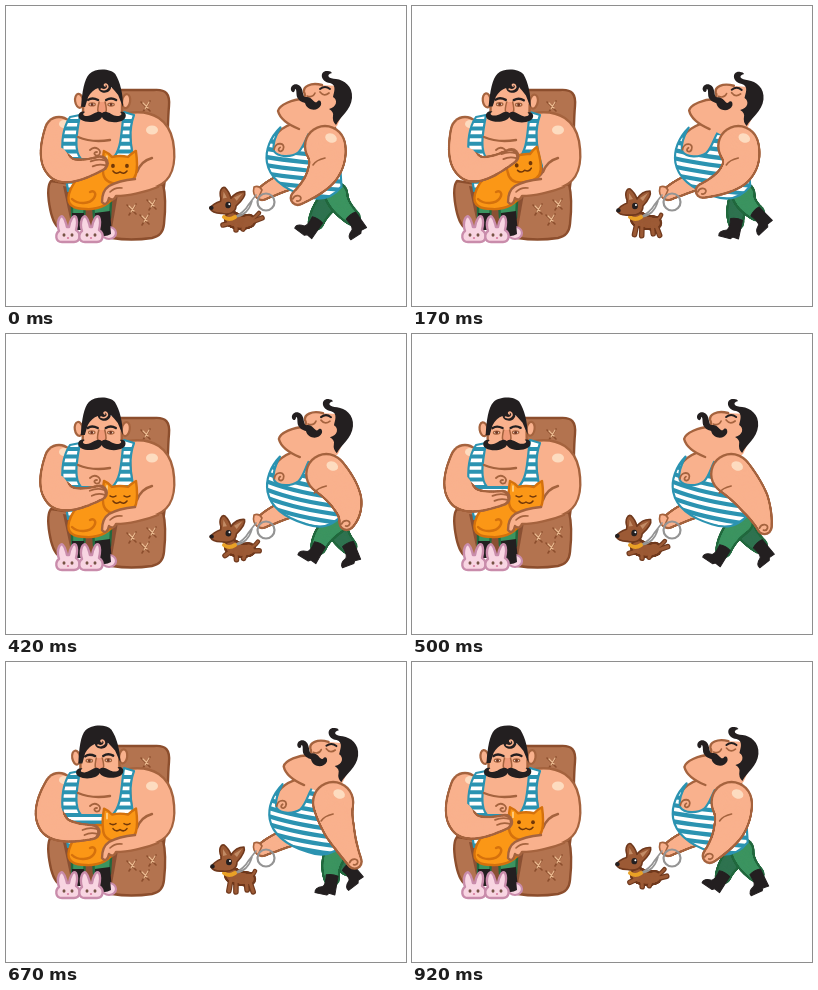
Recreate the animation shown at these times as an HTML page with a canvas. Size 400 px wide and 300 px high, loop 0.96 s.

```html
<!DOCTYPE html>
<html lang="en">
<head>
<meta charset="utf-8">
<title>Strongman and his pets</title>
<style>
html, body { margin: 0; width: 100%; height: 100%; overflow: hidden; background: #fff; }
canvas { display: block; width: 400px; height: 300px; }
</style>
</head>
<body>
<canvas id="stage" width="400" height="300"></canvas>
<script>
const ctx = document.getElementById('stage').getContext('2d');
const LOOP = 960, STANCE = 560;
const SKIN = '#f9b18d', SKIN_LINE = '#a5633e', GLOW = '#fddcc0', BLACK = '#231f20';
const BLUE = '#2b93b1', SOFA = '#b3734f', SOFA_LINE = '#8c4e2d', DARK = '#8a5033';
const GREEN = '#3c9460', GREEN_LINE = '#23693f', PANTS_DARK = '#2f7350';
const CAT = '#fb9716', CAT_LINE = '#d5710c', PINK = '#f8d5e2', PINK_LINE = '#c98cab';
const DOG = '#9c5a35', DOG_LINE = '#70391d', GREY = '#949494';

// Cosine that peaks at the given moment, once or more per loop.
const wave = (t, peak = 0, cycles = 1) => Math.cos((t - peak) / LOOP * cycles * 2 * Math.PI);
const lerp = (a, b, u) => a + (b - a) * u;
const between = (p, q, u) => p.map((v, k) => lerp(v, q[k], u));
const smooth = u => u * u * (3 - 2 * u);

function draw(d, fill, stroke, width = 2.4) {
  const path = new Path2D(d);
  if (fill) { ctx.fillStyle = fill; ctx.fill(path); }
  if (stroke) { ctx.strokeStyle = stroke; ctx.lineWidth = width; ctx.stroke(path); }
}

const line = (d, color, width) => draw(d, null, color, width);

function oval(x, y, rx, ry, fill, stroke, width = 2.2, angle = 0) {
  ctx.beginPath();
  ctx.ellipse(x, y, rx, ry, angle, 0, 7);
  if (fill) { ctx.fillStyle = fill; ctx.fill(); }
  if (stroke) { ctx.strokeStyle = stroke; ctx.lineWidth = width; ctx.stroke(); }
}

function group(dx, dy, degrees, cx, cy, paint) {
  ctx.save();
  ctx.translate(cx + dx, cy + dy);
  ctx.rotate(degrees * Math.PI / 180);
  ctx.translate(-cx, -cy);
  paint();
  ctx.restore();
}

// Tapered limb bent through b; radii belong to a, b and c.
function limb(a, b, c, radii, fill, stroke, from = 0) {
  for (const [grow, color, start] of [[1.2, stroke, from], [-1.2, fill, Math.max(0, from - .15)]]) {
    ctx.fillStyle = color;
    for (let u = start; u <= 1.001; u += .02) {
      const [x, y] = a.map((v, k) =>
        (1 - u) ** 2 * v + 2 * u * (1 - u) * (2 * b[k] - (v + c[k]) / 2) + u * u * c[k]);
      const r = u < .5 ? lerp(radii[0], radii[1], u * 2) : lerp(radii[1], radii[2], u * 2 - 1);
      ctx.beginPath();
      ctx.arc(x, y, r + grow, 0, 7);
      ctx.fill();
    }
  }
}

function striped(d, first, last, gap, drop) {
  ctx.save();
  ctx.clip(new Path2D(d));
  draw(d, '#fff');
  for (let y = first; y < last; y += gap)
    line(`M40,${y} H250 Q285,${y + drop * .7} 345,${y + drop}`, BLUE, gap * .52);
  ctx.restore();
  line(d, BLUE, 2.2);
}

function tuft(x, y) {
  group(x, y, 0, 0, 0, () => {
    line('M-5,-4 L4,5 M4,-5 L-3,6', SOFA_LINE, 1.6);
    line('M-3,-3 L2,2 M3,-4 L-1,3', '#eab98f', 1.3);
  });
}

function bunny(x, y) {
  group(x, y, 0, 0, 0, () => {
    draw('M-9,-3 C-12,-12 -8,-20 -5,-17 C-2,-14 -2,-10 -1,-7 H1 C2,-13 5,-20 8,-17 C10,-13 9,-8 8,-4 ' +
         'C14,0 12,8 6,8 H-6 C-13,8 -13,0 -9,-3Z', PINK, PINK_LINE);
    for (const side of [-4, 4]) oval(side, 1, 1.5, 1.8, '#765345');
    oval(0, 4, 1.2, .9, '#d880a0');
  });
}

function chair() {
  draw('M108,84 H148 C160,83 164,88 163,100 C161,120 163,150 157,188 H105Z', SOFA, SOFA_LINE);
  tuft(140, 100);
  draw('M45,175 C39,182 44,216 53,222 H104 L106,232 Q125,235 146,232 Q157,230 158,218 ' +
       'C160,200 160,190 157,178 L120,186Z', SOFA, SOFA_LINE);
  draw('M57,180 L66,222 H106 L112,188Z', DARK);
  tuft(126, 203); tuft(146, 198); tuft(139, 213);
  draw('M66,196 H79 L78,214 H66Z M87,196 H105 L104,212 H88Z', GREEN, GREEN_LINE);
  draw('M66,207 H78 V224 H66Z M89,207 L104,205 L106,228 Q98,233 90,230Z', BLACK);
  oval(103, 227, 7, 6, PINK, PINK_LINE);
  draw('M94,207 L103,206 L105,228 Q98,232 94,228Z', BLACK);
  bunny(62, 228);
  bunny(85, 228);
}

function sitterHead(sway) {
  group(sway * 2.3 - .5, 0, sway * 1.5, 96, 95, () => {
    oval(73, 95, 4, 7, SKIN, SKIN_LINE, 2.2, -.15);
    oval(120, 95, 4, 7, SKIN, SKIN_LINE, 2.2, .15);
    draw('M78,82 L77,104 Q79,116 86,121 H108 Q115,114 116,104 L113,82Z', SKIN);
    line('M77,98 V106 M116,98 V106', SKIN_LINE);
    draw('M75,101 C76,86 78,73 83,68 C89,62 104,62 109,68 C114,76 117,88 117,101 ' +
         'L112,89 Q108,84 105,81 C104,89 93,88 92,82 Q86,84 82,91 L79,101Z', BLACK);
    line('M95,83 C99,85 103,82 101,79 C99,77 97,79 99,80', SKIN, 1.5);
    line('M82,94 Q86,91 92,94 M100,94 Q105,91 110,94', BLACK, 2.4);
    for (const x of [86, 105]) {
      oval(x, 98.5, 3.2, 1.5, '#fff3e8', SKIN_LINE, 1.3);
      oval(x, 98.5, 1.5, 1.5, '#6e3623');
    }
    draw('M93,96 C91,104 91,108 96,109 C101,108 101,104 99,96', '#f09a78', SKIN_LINE, 1.5);
    draw('M96,107 C91,103 87,110 81,110 C77,110 76,108 79,106 C73,104 70,111 75,114 C82,118 94,116 96,111 ' +
         'C98,116 110,118 117,114 C122,111 120,104 114,106 C117,108 115,110 111,110 C106,110 101,103 96,107Z', BLACK);
  });
}

function cat(t, sway) {
  draw('M99,164 C83,159 67,173 63,188 C60,200 69,203 80,203 C95,204 104,197 112,187 L118,174Z', CAT, CAT_LINE);
  line('M66,193 C72,199 84,198 88,192 C91,187 88,184 84,186', CAT_LINE);
  const pressed = Math.max(0, sway) ** 3;
  group(-2 * pressed, 2 * Math.sin(t / LOOP * Math.PI) - 3 * pressed, -10 * pressed, 114, 163, () => {
    draw('M98,145 Q103,147 106,151 Q114,149 122,151 Q126,147 130,145 C131,152 132,160 130,168 ' +
         'C128,176 120,178 114,178 C103,178 97,174 97,165 C96,158 97,151 98,145Z', CAT, CAT_LINE);
    line('M101,150 V155', '#ffd08a', 1.7);
    if (t > 220 && t < 860) {
      line('M104,160 Q107,162 110,160 M118,160 Q121,162 124,160', '#713708', 1.5);
    } else {
      for (const x of [107, 121]) oval(x, 160, 1.9, 2.1, '#713708');
    }
    line('M107,165 Q110,169 114,166 Q118,169 121,165', '#713708', 1.5);
  });
}

function sitter(t) {
  const sway = wave(t, 200);
  const shoulder = [53, 125], elbow = [53 + 6 * sway, 161], hand = [93 + 6.5 * sway, 160 - 10 * sway];
  const arm = from => limb(shoulder, elbow, hand, [14, 14, 7], SKIN, SKIN_LINE, from);

  arm(0);
  oval(58, 118, 5, 4, GLOW);
  draw('M64,111 Q96,100 128,109 L140,150 L112,186 H62Z', SKIN);
  draw('M122,107 C148,103 163,115 167,135 C171,158 166,175 150,181 C135,186 125,187 112,189 L114,176 ' +
       'C124,172 128,172 131,165 L126,150Z', SKIN, SKIN_LINE);
  oval(146, 124, 6, 4.5, GLOW);
  line('M131,166 Q135,155 146,152', SKIN_LINE);
  striped('M64,111 L74,109 C70,130 68,145 75,153 H106 C116,145 115,125 118,106 L128,109 ' +
          'C122,125 125,145 130,160 L115,185 H62 L57,152 C55,135 58,120 64,111Z', 115, 190, 7.6, 0);
  line('M72,131 Q86,137 104,134', SKIN_LINE);
  line('M84,144 C89,139 97,144 93,149 C89,151 86,146 91,146', SKIN_LINE, 1.8);
  sitterHead(sway);
  cat(t, sway);
  draw('M129,173 C118,174 110,176 103,180 C97,184 96,191 96,196 C99,200 102,197 103,192 ' +
       'C106,195 109,193 110,190 C122,190 140,186 152,181', SKIN, SKIN_LINE);
  line('M104,186 Q109,181 116,182', SKIN_LINE, 1.6);
  arm(.48);
  group(...hand, 0, 0, 0, () => line('M-10,-2 Q-3,-5 4,-3 M-8,3 Q-2,0 5,2', SKIN_LINE, 1.8));
}

// The foot rolls back along the ground, then swings forward.
function leg(time, hip, color) {
  const t = time % LOOP;
  const stance = Math.min(1, t / STANCE);
  const swing = Math.max(0, (t - STANCE) / (LOOP - STANCE));
  const x = lerp(lerp(299, 361, stance), 299, smooth(swing));
  const pitch = swing ? lerp(-60, 32, smooth(swing)) : 32 * (1 - stance) ** 3 - 60 * stance ** 3;
  const a = pitch * Math.PI / 180;
  const y = 231 - 9 * Math.abs(Math.sin(a)) - 7 * Math.sin(swing * Math.PI);
  const cuff = [x + 4 * Math.cos(a) + 14 * Math.sin(a), y + 4 * Math.sin(a) - 14 * Math.cos(a)];
  const knee = between(hip, cuff, .5);
  knee[0] -= 3;
  limb(hip, knee, cuff, [11, 9, 7], color, GREEN_LINE);
  group(x, y, pitch, 0, 0, () =>
    draw('M-11,2 Q-12,-3 -4,-5 Q-1,-7 -2,-17 Q4,-19 10,-17 L9,2 L3,1 L1,3Z', BLACK, BLACK, 1));
}

function walkerHead(lift) {
  group(6.5 * lift, .7 * lift, 2 * lift, 310, 100, () => {
    draw('M335,80 L313,79 C304,77 297,81 298,86 Q300,90 297,93 C287,93 273,99 272,105 ' +
         'C274,113 283,119 292,122 L312,132 L331,120 L340,100Z', SKIN);
    line('M316,79 C304,76 297,81 298,86 Q300,90 297,93 C287,93 273,99 272,105 C274,113 283,119 293,123', SKIN_LINE);
    line('M301,90 Q307,92 309,87', SKIN_LINE, 1.6);
    line('M314,86 Q318,91 323,87', SKIN_LINE, 1.7);
    line('M314,83 Q319,79 324,83', BLACK, 2);
    draw('M322,65 C313,64 314,76 324,77 C331,79 328,86 327,91 C332,94 331,101 323,103 Q328,106 327,110 ' +
         'Q326,115 330,119 C334,111 345,104 346,92 C347,80 338,74 330,73 C323,73 319,69 326,67 Q325,65 322,65Z', BLACK);
    draw('M300,91 C296,92 298,84 294,80 C290,76 284,79 285,84 C286,87 289,87 289,83 C291,83 290,87 291,91 ' +
         'C293,95 296,96 299,97 C301,105 312,106 315,99 C316,95 313,93 311,96 C308,98 306,90 300,91Z', BLACK);
  });
}

function walker(t, lift) {
  const sway = 3 * lift, stride = wave(t);
  limb([284 + sway, 174], [268 + sway / 2, 181], [256, 188], [9, 8, 6], SKIN, SKIN_LINE);
  draw('M248,181 Q253,179 256,184 L252,193 Q246,189 248,181Z', SKIN, SKIN_LINE, 1.6);
  const hip = [330 + sway / 2, 188];
  leg(t, hip, PANTS_DARK);
  leg(t + LOOP / 2, hip, GREEN);
  group(sway, 0, stride, 310, 150, () => {
    draw('M286,118 C270,124 264,135 267,148 Q285,160 300,150 L332,145 L328,118Z', SKIN, SKIN_LINE);
    striped('M274,122 C264,132 259,145 261,157 C264,173 277,183 299,190 C313,195 326,193 336,180 ' +
            'L332,130 L306,123 C300,128 299,140 292,147 C285,152 272,152 268,146 C266,140 269,130 274,122Z',
            101, 205, 8.2, 17 - 8 * stride);
    line('M268,144 C269,136 280,137 277,144 C275,148 270,145 274,142', SKIN_LINE, 1.8);
  });
  walkerHead(lift);

  const shoulder = [319 + 9 * lift, 140];
  const elbow = [329 - 12 * stride, 166];
  const hand = [321 - 35 * wave(t, 90), 192 - 8 * wave(t, 240)];
  limb(shoulder, elbow, hand, [20, 15, 7], SKIN, SKIN_LINE);
  group(...shoulder, 0, 0, 0, () => {
    oval(6, -8, 6, 4.5, GLOW, null, 0, .4);
    line('M-12,19 Q-9,14 0,12', SKIN_LINE, 1.6);
  });
  group(...hand, 0, 0, 0, () => line('M-5,1 C-3,-4 4,-3 3,1 Q2,4 -1,3', SKIN_LINE, 1.8));
}

function dog(t, lift) {
  const leap = (1 - lift) ** 2;
  const step = 2 * lift * Math.sin(t / 240 * Math.PI);
  // Forelegs and hind legs: root, standing foot, leaping foot.
  const legs = [
    [[225, 217], [224, 229], [217, 219]], [[240, 217], [240, 228], [237, 223]],
    [[230, 218], [231, 230], [230, 224]], [[243, 217], [246, 230], [256, 212]]
  ].map(([root, stand, jump], i) => {
    const [x, y] = between(stand, jump, leap);
    return `M${root} L${x + (i % 2 ? step : -step)},${y}`;
  }).join(' ');
  const tail = `M243,214 Q247,214 ${between([249, 209], [253, 207], leap)}`;

  line(tail, DOG_LINE, 4.5);
  line(legs, DOG_LINE, 5.6);
  limb([226, 213], [234, 216], [243, 217 - 2 * leap], [7, 6.5, 6], DOG, DOG_LINE);
  line(legs, DOG, 3.2);
  line(tail, DOG, 2.2);
  oval(260, 196, 8.5, 8.5, null, GREY, 2.2);
  line('M227,212 Q238,207 243,198 L250,189 M230,211 Q242,209 246,195', GREY, 1.6);
  line('M218,211 Q223,215 229,211', '#e9a126', 4);
  group(-leap, -leap, 6 * leap, 223, 202, () => {
    draw('M215,194 C212,187 215,182 218,183 Q223,187 225,193 Q230,185 238,185 Q240,190 231,200 ' +
         'C231,207 225,210 217,209 Q208,210 205,205 Q208,200 215,197Z', DOG, DOG_LINE, 1.6);
    draw('M217,187 L221,193 L217,194Z M236,187 L231,195 L228,192Z', '#c28b65');
    oval(223, 200, 2.9, 3.2, BLACK);
    oval(224, 199, 1, 1, '#fff');
    oval(206.5, 204.5, 2.3, 2.1, BLACK);
  });
}

function frame(now) {
  const t = now % LOOP;
  const lift = (1 - wave(t, 0, 2)) / 2;
  ctx.fillStyle = '#fff';
  ctx.fillRect(0, 0, 400, 300);
  chair();
  sitter(t);
  walker(t, lift);
  dog(t, lift);
  requestAnimationFrame(frame);
}

ctx.lineCap = ctx.lineJoin = 'round';
requestAnimationFrame(frame);
</script>
</body>
</html>
```
